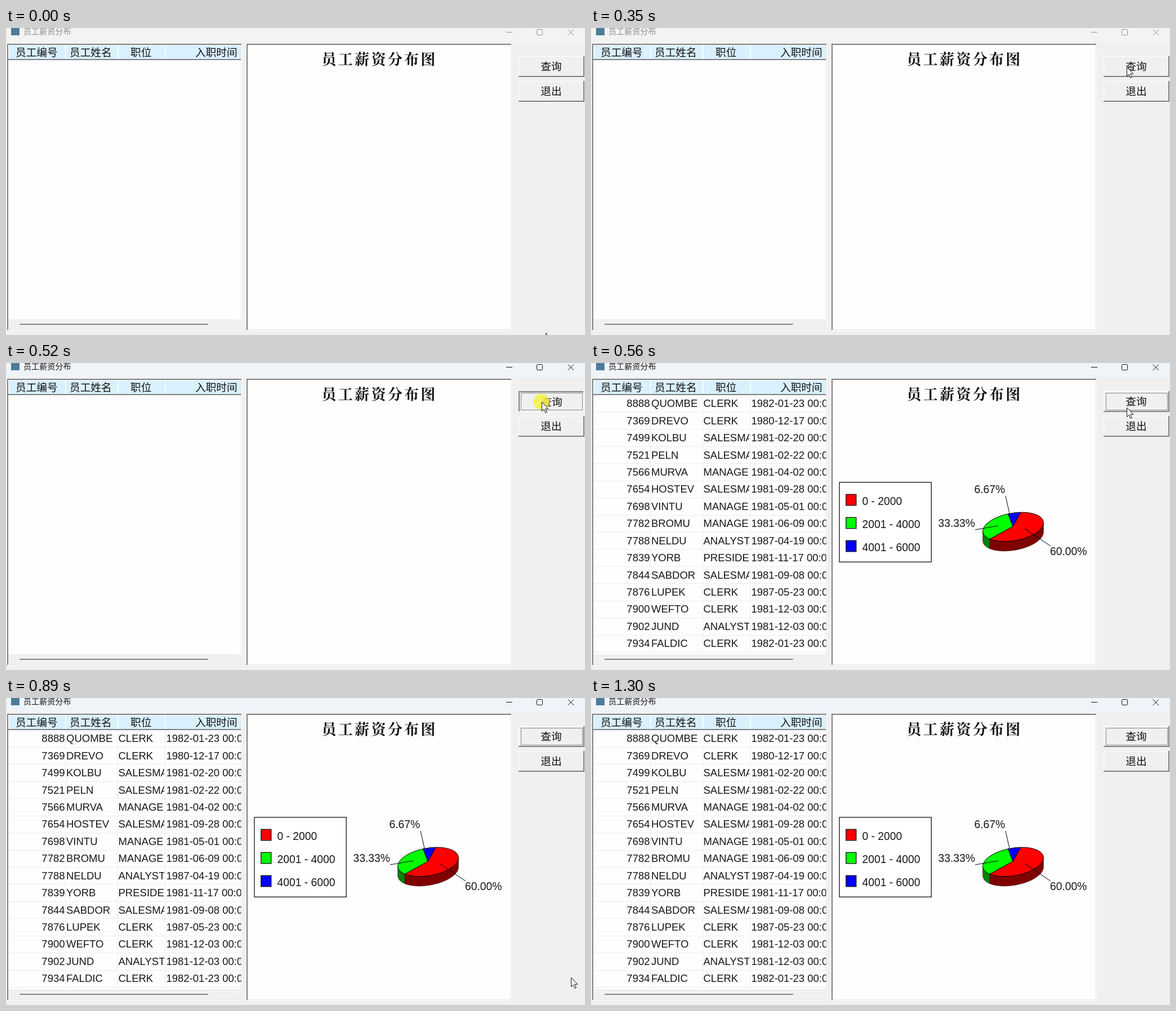
Write an HTML page that moves like this. It is 1028 by 545 pixels and loops after 1370 ms.

```html
<!DOCTYPE html>
<html lang="zh-CN">
<head>
<meta charset="utf-8">
<title>员工薪资分布</title>
<style>
html, body { margin: 0; width: 100%; height: 100%; overflow: hidden; background: #f0f0f0; }
svg { display: block; width: 1028px; height: 545px; }
text { font: 18.5px "Liberation Sans", Arial, sans-serif; fill: #161616; white-space: pre; }
.cjk { font: 300 18.7px "Noto Sans CJK SC", "Noto Sans CJK", sans-serif; fill: #111; }
.heading { font: 700 26px "Noto Serif CJK SC", "Noto Sans CJK SC", serif; letter-spacing: 3.3px; }
.caption { font: 400 14.1px "Noto Sans CJK SC", "Noto Sans CJK", sans-serif; fill: currentColor; }
.chart text { font-size: 19.3px; }
.end { text-anchor: end; }
.mid { text-anchor: middle; }
</style>
</head>
<body>
<svg id="stage" viewBox="0 0 1028 545"></svg>
<script>
const LOOP = 1370, CLICK = 420, RESULT = 560, GONE = 1300;

// time, x, y of the pointer tip; each position holds until the next
const pointerSteps = [
  [0, 958, 541], [70, 958, 515], [140, 957, 410], [210, 955, 255], [280, 952, 120],
  [350, 951, 69], [560, 951, 79], [620, 961, 130], [690, 990, 300], [760, 1009, 446],
  [820, 1008, 478], [890, 1003, 496], [960, 994, 505], [1030, 985, 512],
  [1100, 979, 524], [1170, 977, 531], [1240, 976, 538]
];

const employees = [
  [8888, 'QUOMBE', 'CLERK', '1982-01-23'],
  [7369, 'DREVO', 'CLERK', '1980-12-17'],
  [7499, 'KOLBU', 'SALESMAN', '1981-02-20'],
  [7521, 'PELN', 'SALESMAN', '1981-02-22'],
  [7566, 'MURVA', 'MANAGER', '1981-04-02'],
  [7654, 'HOSTEV', 'SALESMAN', '1981-09-28'],
  [7698, 'VINTU', 'MANAGER', '1981-05-01'],
  [7782, 'BROMU', 'MANAGER', '1981-06-09'],
  [7788, 'NELDU', 'ANALYST', '1987-04-19'],
  [7839, 'YORB', 'PRESIDENT', '1981-11-17'],
  [7844, 'SABDOR', 'SALESMAN', '1981-09-08'],
  [7876, 'LUPEK', 'CLERK', '1987-05-23'],
  [7900, 'WEFTO', 'CLERK', '1981-12-03'],
  [7902, 'JUND', 'ANALYST', '1981-12-03'],
  [7934, 'FALDIC', 'CLERK', '1982-01-23']
];

const rect = (x, y, w, h, fill, extra = '') =>
  `<rect x="${x}" y="${y}" width="${w}" height="${h}" fill="${fill}" ${extra}/>`;
const path = (d, stroke, width = 1, fill = 'none') =>
  `<path d="${d}" stroke="${stroke}" stroke-width="${width}" fill="${fill}"/>`;
const label = (x, y, words, cls = '') => `<text x="${x}" y="${y}" class="${cls}">${words}</text>`;

function panel(x, y, w, h) {
  return rect(x, y, w, h, '#fff') + rect(x, y, w - 1, h - 1, '#e3e3e3') +
    rect(x, y, w - 1, 2, '#808080') + rect(x, y, 2, h - 1, '#808080') +
    rect(x + 2, y + 2, w - 4, h - 4, '#fefefe');
}

function button(x, y, words, sunken = false) {
  const w = 117, h = 37, shift = sunken ? 1 : 0;
  const dark = sunken
    ? rect(x, y, w - 2, 2, '#808080') + rect(x, y, 2, h - 1, '#808080')
    : rect(x, y + h - 2, w, 2, '#808080') + rect(x + w - 2, y, 2, h, '#808080');
  return rect(x, y, w, h, '#fff') + rect(x + 1, y + 1, w - 2, h - 2, '#f0f0f0') + dark +
    label(x + 58 + shift, y + 24.8 + shift, words, 'cjk mid');
}

function windowBar() {
  return rect(0, 0, 1028, 26, '#f3f3f3', 'id="barFill"') + rect(9, 0, 15, 13, '#4d7c9b') +
    `<g id="bar">${label(31, 11.3, '员工薪资分布', 'caption')}` +
    path('M888 7.5h11M997.5 2.5l10.5 10.5M1008 2.5l-10.5 10.5', 'currentColor') +
    rect(942.5, 2.5, 10, 10, 'none', 'rx="1.8" stroke="currentColor"') + '</g>';
}

function header() {
  const titles = [[17, '员工编号'], [113, '员工姓名'], [221, '职位'], [336, '入职时间']];
  return rect(4, 30, 413, 25, '#d9f0fe') + rect(4, 30, 413, 1, '#fff') +
    rect(4, 55, 413, 2, '#808080') +
    [4, 105, 198, 282].map(x => rect(x, 30, 1.6, 25, '#fff')).join('') +
    titles.map(([x, words]) => label(x, 50, words, 'cjk')).join('');
}

function table() {
  const rows = employees.map(([id, name, job, date], i) => {
    const y = 78.3 + i * 30.43;
    return label(104.5, y, id, 'end') + label(107, y, name) +
      `<g clip-path="url(#jobs)">${label(199.5, y, job)}</g>` +
      `<g clip-path="url(#dates)">${label(284.5, y, date + ' 00:00:00')}</g>` +
      rect(4, Math.round(y + 8.7), 413, 1, '#ececec');
  });
  return rows.join('') + [105, 198, 282].map(x => rect(x, 57, 1, 457, '#ececec')).join('');
}

function pie() {
  const cx = 749.5, cy = 291, rx = 54.5, ry = 24.5, tilt = -10, depth = 17, rad = Math.PI / 180;
  const cos = Math.cos(tilt * rad), sin = Math.sin(tilt * rad);
  const at = (deg, drop = 0) => {
    const u = rx * Math.cos(deg * rad), v = ry * Math.sin(deg * rad);
    return `${(cx + u * cos - v * sin).toFixed(2)} ${(cy + u * sin + v * cos + drop).toFixed(2)}`;
  };
  const arc = (from, to, drop) =>
    `A${rx} ${ry} ${tilt} ${Math.abs(to - from) > 180 ? 1 : 0} ${to > from ? 1 : 0} ${at(to, drop)}`;
  const side = (a, b, fill) =>
    path(`M${at(a)}${arc(a, b)}L${at(b, depth)}${arc(b, a, depth)}Z`, '#200', 0.6, fill);
  const slice = (a, b, fill) => path(`M749 290L${at(a)}${arc(a, b)}Z`, '#000', 1, fill);
  const right = Math.atan(-ry / rx * sin / cos) / rad;
  return side(right, 145, '#800000') + side(145, right + 180, '#008000') +
    slice(-71, 145, '#f00') + slice(145, 265, '#0f0') + slice(265, 289, '#00f');
}

function chart() {
  const bands = [['#f00', '0 - 2000'], ['#0f0', '2001 - 4000'], ['#00f', '4001 - 6000']];
  return rect(441, 211.8, 163.2, 141.4, '#fff', 'stroke="#180c14" stroke-width="1.3"') +
    bands.map(([fill, words], i) =>
      rect(452.8, 233.2 + 41 * i, 18, 19.6, fill, 'stroke="#111" stroke-width="1.3"') +
      label(481.5, 252 + 41 * i, words)).join('') +
    pie() + path('M736 236L743 267M723 289L682 296M770 294L816 325', '#000') +
    label(680.5, 231.3, '6.67%') + label(616.5, 291, '33.33%') + label(815, 341.3, '60.00%');
}

const stage = document.getElementById('stage');
stage.innerHTML =
  `<defs><clipPath id="jobs">${rect(198, 57, 83, 460, '#000')}</clipPath>` +
  `<clipPath id="dates">${rect(283, 57, 134.5, 460, '#000')}</clipPath></defs>` +
  rect(0, 0, 1028, 545, '#f0f0f0') + windowBar() +
  panel(2, 28, 417, 509) + header() +
  `<g id="rows">${table()}</g>` +
  rect(4, 517, 413, 18, '#f0f0f0') + rect(24, 525, 335, 2, '#868686', 'rx="1"') +
  panel(427, 28, 471, 509) + label(560.5, 64.5, '员工薪资分布图', 'cjk heading') +
  `<g id="chart" class="chart">${chart()}</g>` +
  `<g id="raised">${button(910, 50, '查询')}</g>` +
  `<g id="pressed">${button(910, 50, '查询', true)}</g>` +
  button(910, 94, '退出') +
  rect(914.5, 53.5, 109, 30, 'none', 'id="focus" stroke="#222" stroke-dasharray="1 1"') +
  '<circle id="glow" cx="950.5" cy="69" r="14" fill="#f6f23c" opacity=".82"/>' +
  `<g id="pointer">${path('M.5 .5V16.5L4.2 13.2L6.8 19.3L9.3 18.2L6.7 12.2H11.8Z', '#111', 1, '#fff')}</g>`;

const part = id => document.getElementById(id);
const show = (id, on) => part(id).setAttribute('visibility', on ? 'visible' : 'hidden');

function draw() {
  const t = performance.now() % LOOP;
  const clicked = t >= CLICK, done = t >= RESULT, held = clicked && !done;
  const [, x, y] = pointerSteps.findLast(step => step[0] <= t);
  part('bar').setAttribute('color', clicked ? '#111' : '#8c8c8c');
  part('barFill').setAttribute('fill', clicked ? '#eff4f9' : '#f3f3f3');
  show('rows', done);
  show('chart', done);
  show('raised', !held);
  show('pressed', held);
  show('glow', held);
  show('focus', clicked);
  show('pointer', t < GONE);
  part('pointer').setAttribute('transform', `translate(${x} ${y})`);
  requestAnimationFrame(draw);
}
draw();
</script>
</body>
</html>
```
